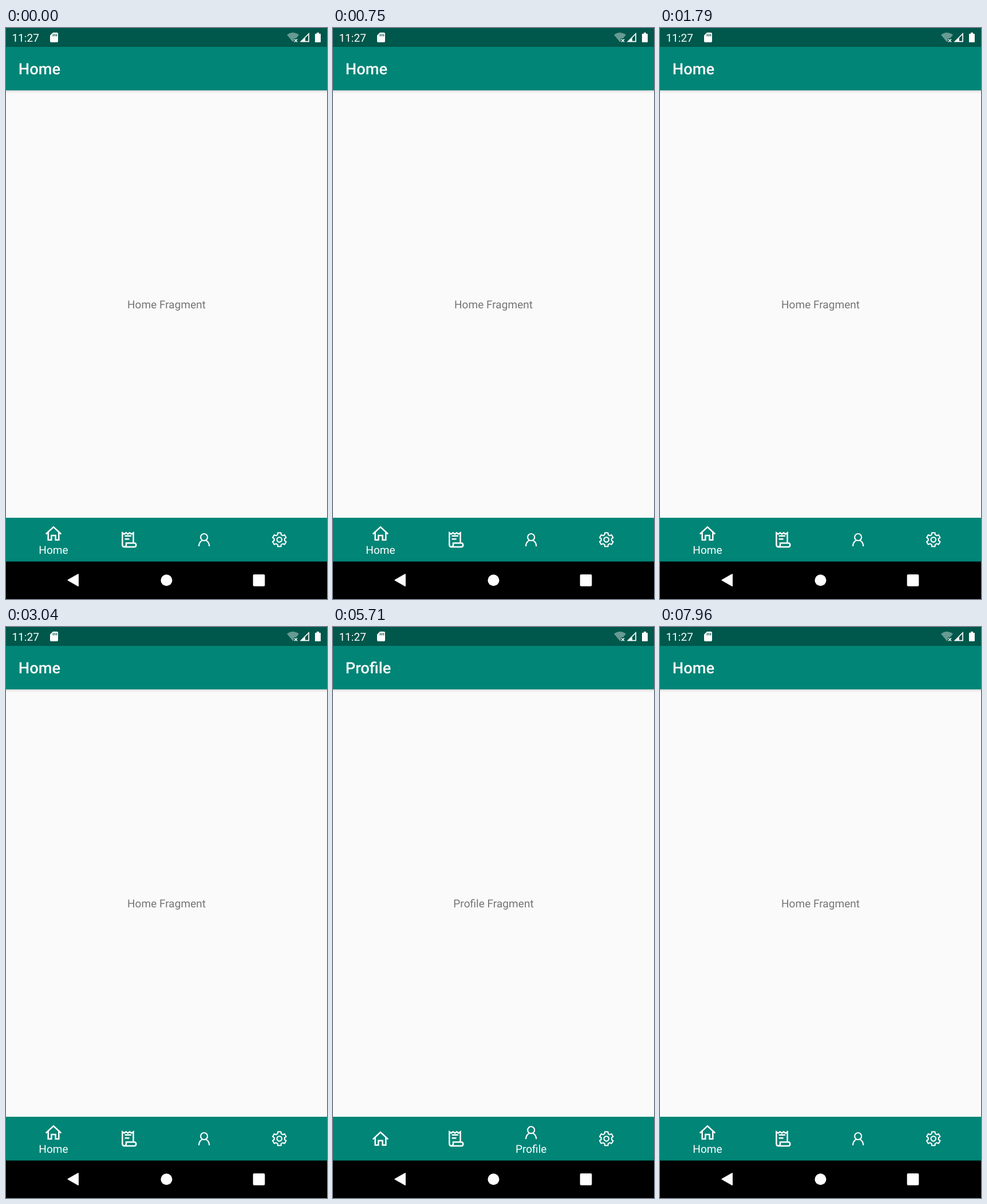
Write an HTML page that moves like this. It is 561 px wide and 998 px high and loops after 8 s.

```html
<!DOCTYPE html>
<html lang="en">
<head>
<meta charset="utf-8">
<style>
  html, body { margin: 0; width: 100%; height: 100%; overflow: hidden; background: #fafafa; }
  svg { display: block; width: 561px; height: 998px; font: 19.09px Roboto, sans-serif; fill: #fff; text-rendering: geometricPrecision; }
  .line { fill: none; stroke: #fff; stroke-width: 2.5; }
  .center { text-anchor: middle; }
</style>
</head>
<body>
<svg viewBox="0 0 561 998">
  <defs>
    <linearGradient id="shadow" x2="0" y2="1">
      <stop stop-color="#000" stop-opacity=".12"/>
      <stop offset="1" stop-color="#000" stop-opacity="0"/>
    </linearGradient>
  </defs>

  <rect width="561" height="998" fill="#fafafa"/>
  <rect y="109" width="561" height="5" fill="url(#shadow)"/>
  <rect y="33" width="561" height="76" fill="#008577"/>
  <rect width="561" height="33" fill="#00574b"/>
  <rect y="856" width="561" height="77" fill="#008577"/>
  <rect y="932.5" width="561" height="65.5" fill="#000"/>

  <!-- status bar -->
  <text x="10.4" y="24">11:27</text>
  <path d="M82 8h7q2 0 2 2v13q0 2-2 2H79q-2 0-2-2V13z"/>
  <path d="M82.5 10.5v4M85.5 10.5v4M88.5 10.5v4" stroke="#00574b" stroke-width="1.4"/>
  <path d="M491 12q10.5-8 21 0l-5 6h-4v5l-1.5 1.5z" opacity=".4"/>
  <path d="M504 19.5l5 5m0-5l-5 5" stroke="#fff" stroke-width="1.6"/>
  <path fill-rule="evenodd" d="M530 8v16.5h-16.5zM528.3 12v10.8H523v-5.5z"/>
  <path d="M543 8h4v2h2q1 0 1 1v13q0 1-1 1h-8q-1 0-1-1V11q0-1 1-1h2z"/>

  <text id="title" x="21.8" y="81.3" font-size="27.27" font-weight="500"></text>
  <text id="body" class="center" x="280.5" y="490" fill="#757575"></text>

  <g id="tabs">
    <g class="line">
      <path d="M-13.3 1L0-11.3 13.3 1M-9.3-2V11.3H-3.6V3.5H3.6V11.3H9.3V-2"/>
    </g>
    <g class="line">
      <path d="M8 6V-12l-3.2 2.200-3.200-2.200-3.200 2.200-3.200-2.200-3.200 2.200-3.200-2.200V9q0 3.700 3.700 3.700H9.500q3.200 0 3.200-3.300T9.500 6H-4.500V9q0 3.700-3.500 3.700M-7-6.500H4.500M-7-1H1"/>
    </g>
    <g class="line" style="stroke-width:2.200">
      <circle cy="-4.300" r="6"/>
      <path d="M-9.200 11.500Q-8.500 3.500-3 1.200M9.200 11.500Q8.500 3.500 3 1.200"/>
    </g>
    <g class="line" style="stroke-width:2.100" stroke-linejoin="round">
      <circle r="4.300"/>
      <path id="gear"/>
    </g>
  </g>

  <!-- system navigation -->
  <path d="M108.500 965L126 955v20z" stroke="#fff" stroke-width="2" stroke-linejoin="round"/>
  <circle cx="280.500" cy="965.200" r="10"/>
  <rect x="431.700" y="955" width="20.700" height="20.700" rx="2"/>
</svg>
<script>
  const LOOP = 8000, SLIDE = 115;
  const names = ["Home", "History", "Profile", "Settings"];
  const visits = [[0, 0], [3200, 1], [4800, 2], [6300, 3], [7100, 0]]; // [ms, tab]
  const $ = id => document.getElementById(id);

  const polar = (r, deg) => {
    const a = deg * Math.PI / 180;
    return `${(r * Math.cos(a)).toFixed(2)} ${(r * Math.sin(a)).toFixed(2)}`;
  };
  const teeth = [];
  for (let a = 30; a < 390; a += 60)
    teeth.push(polar(9.2, a - 20), polar(12.3, a - 13), polar(12.3, a + 13), polar(9.2, a + 20));
  $("gear").setAttribute("d", `M${teeth.join("L")}Z`);

  const tabs = [...$("tabs").children].map((icon, i) => {
    const label = document.createElementNS("http://www.w3.org/2000/svg", "text");
    const x = 83 + 131.6 * i;
    label.textContent = names[i];
    label.setAttribute("class", "center");
    label.setAttribute("x", x);
    label.setAttribute("y", 919);
    $("tabs").append(label);
    return { icon, label, x };
  });

  function draw(now) {
    const t = now % LOOP;
    const step = visits.findLastIndex(([start]) => t >= start);
    const [start, current] = visits[step];
    const previous = step ? visits[step - 1][1] : current;
    const p = Math.min(1, (t - start) / SLIDE);
    const eased = p * p * (3 - 2 * p);

    $("title").textContent = names[current];
    $("body").textContent = names[current] + " Fragment";
    tabs.forEach(({ icon, label, x }, i) => {
      const active = i === current ? (previous === current ? 1 : eased)
                   : i === previous ? 1 - eased : 0;
      icon.setAttribute("transform", `translate(${x} ${894.3 - 10.8 * active})`);
      label.setAttribute("opacity", active);
    });
    requestAnimationFrame(draw);
  }
  draw(performance.now());
</script>
</body>
</html>
```
